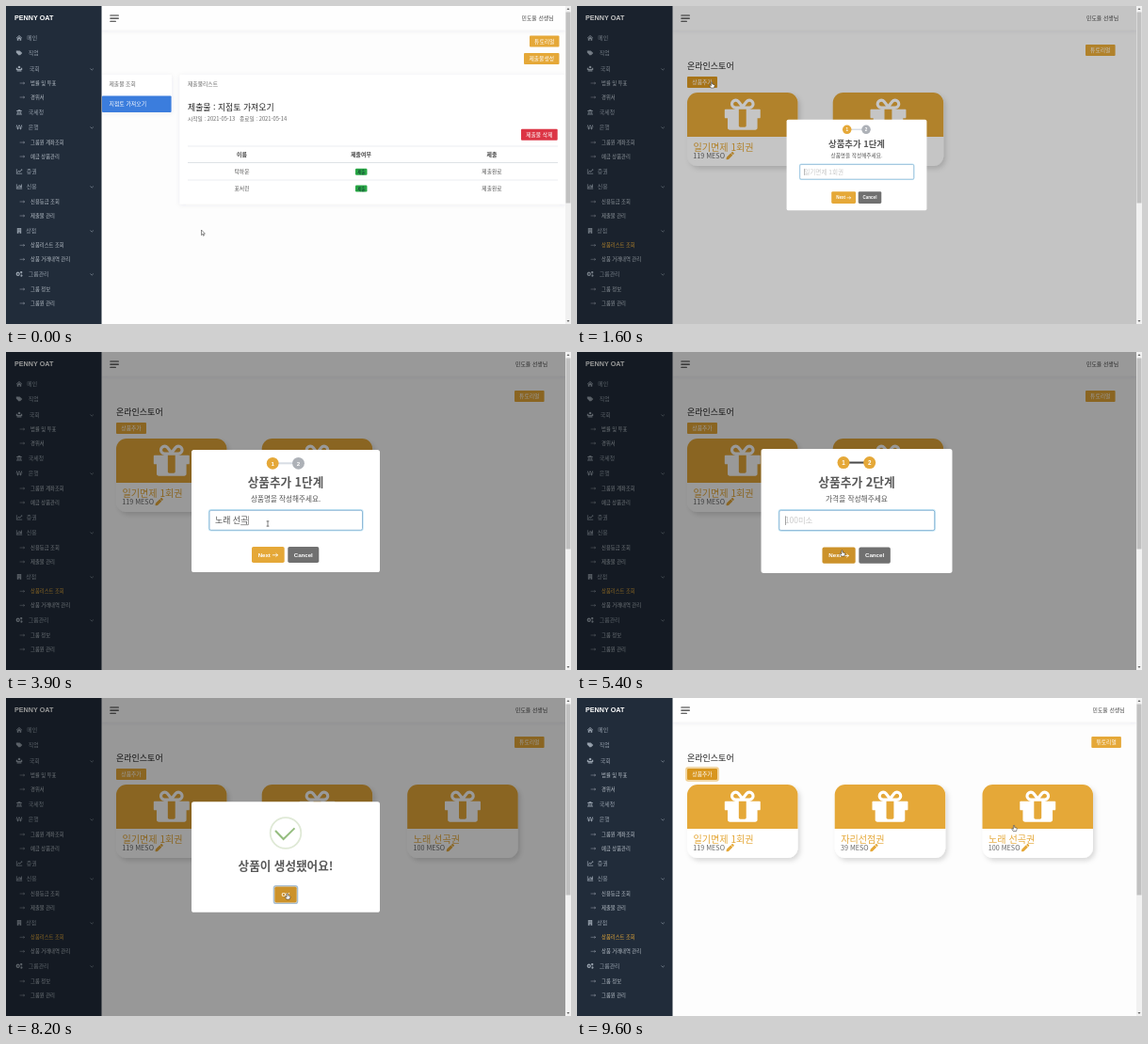
Animation, 600 px wide and 338 px high, one loop 9700 ms. Source, as an HTML page:

```html
<!DOCTYPE html>
<html lang="ko">
<head>
<meta charset="utf-8">
<title>온라인스토어</title>
<style>
html, body { margin: 0; width: 100%; height: 100%; overflow: hidden; background: #fdfdfd; }
svg { display: block; width: 600px; height: 338px; }
text { font-family: "Noto Sans CJK KR", "Noto Sans CJK", "Noto Sans", sans-serif; white-space: pre; }
.latin { font-family: "Liberation Sans", Arial, sans-serif; font-weight: 700; }
</style>
</head>
<body>
<svg id="stage" viewBox="0 0 600 338" xmlns="http://www.w3.org/2000/svg"></svg>
<script>
const LOOP = 9700, STEP = 100;
const ORANGE = '#e5a838', ORANGE_HOVER = '#cc922a', NAVY = '#212c3a';

// Drawn with y pointing up
const GIFT = 'M928 180v716h-320v-716q0-25 18-38.5t46-13.5h192q28 0 46 13.5t18 38.5zM472 1024h195l-126 161q-26 31-69 31q-40 0-68-28t-28-68t28-68t68-28zM1160 1120q0 40-28 68t-68 28q-43 0-69-31l-125-161h194q40 0 68 28t28 68zM1536 864v-320q0-14-9-23t-23-9h-96v-416q0-40-28-68t-68-28h-1088q-40 0-68 28t-28 68v416h-96q-14 0-23 9t-9 23v320q0 14 9 23t23 9h440q-93 0-158.5 65.5t-65.5 158.5t65.5 158.5t158.5 65.5q107 0 168-77l128-165l128 165q61 77 168 77q93 0 158.5-65.5t65.5-158.5t-65.5-158.5t-158.5-65.5h440q14 0 23-9t9-23z';
const PENCIL = 'M498 142l-46 46c-5 5-12 5-17 0l-111-111c-5-5-5-12 0-17l46-46c19-19 49-19 68 0l60 60c19 19 19 49 0 68zM284 100L22 362 0 484c-3 16 11 31 28 28l122-21 262-263c5-5 5-12 0-17l-111-111c-5-5-12-5-17 0z';

// Markup helpers
const text = (x, y, str, size, fill, extra = '') =>
  `<text x="${x}" y="${y}" font-size="${size}" fill="${fill}" ${extra}>${str}</text>`;
const mid = (x, y, str, size, fill, extra = '') =>
  text(x, y, str, size, fill, 'text-anchor="middle" ' + extra);
const rect = (x, y, w, h, fill, r = 0, extra = '') =>
  `<rect x="${x}" y="${y}" width="${w}" height="${h}" rx="${r}" fill="${fill}" ${extra}/>`;
const path = (d, extra) => `<path d="${d}" ${extra}/>`;
const line = (d, color, width) =>
  path(d, `fill="none" stroke="${color}" stroke-width="${width}" stroke-linecap="round" stroke-linejoin="round"`);
const group = (id, body, extra = '') => `<g id="${id}" ${extra}>${body}</g>`;
const button = (x, y, w, h, label, fill = ORANGE, id = '') =>
  rect(x, y, w, h, fill, 1, id && `id="${id}"`) + mid(x + w / 2, y + h / 2 + 2.1, label, 5.8, '#fff');

const ICONS = {
  home: 'M-3.2 .2L0-2.8 3.2 .2 2.7 .7 0-1.8-2.7 .7zM-2.2 .9L0-1.1 2.2 .9V2.9H.6V1.2H-.6V2.9H-2.2z',
  tag: 'M-3.2-2.4H-.3L2.2 .1-.3 2.6-3.2-.2zM.6-2.4L3.3 .2 .8 2.7 .3 2.2 2.3 .2-.2-2.4z',
  people: 'M-1.3-1.8a1.3 1.3 0 1 1 2.6 0a1.3 1.3 0 1 1-2.6 0zM-3.2-1h1.4v1.2h3.6V-1H3.2V1.2H-3.2zM-2.4 1.5H2.4V2.8H-2.4z',
  bank: 'M-3-1.2L0-2.9 3-1.2V-.7H-3zM-2.2-.4h1v2h-1zM-.5-.4h1v2h-1zM1.2-.4h1v2h-1zM-3 1.9H3V2.8H-3z',
  won: 'M-3.2-2.4H-2.3L-1.5 .9-.5-2.4H.5L1.5 .9 2.3-2.4H3.2L2 2.5H1L0-.6-1 2.5H-2zM-3.3-.7H3.3V0H-3.3z',
  chart: 'M-3.1-2.6H-2.4V2H3.2V2.7H-3.1zM-1.8 .6L-.4-1 .6 0 2.2-1.7 1.6-2.3H3.2V-.7L2.7-1.2 .6 1-.4 0-1.3 1.1z',
  bars: 'M-3.1-2.6H-2.4V2H3.2V2.7H-3.1zM-1.8 0H-.9V1.5H-1.8zM-.4-1.8H.5V1.5H-.4zM1-1H1.8V1.5H1zM2.2-2.2H3V1.5H2.2z',
  shop: 'M-2.2-2.9H2.2V2.9H.6V1.5H-.6V2.9H-2.2zM-1.3-2V-1.2H-.4V-2zM.4-2V-1.2H1.3V-2zM-1.3-.4V.4H-.4V-.4zM.4-.4V.4H1.3V-.4z',
  cogs: 'M-3.4 0L-2.8-1.7-1-2.3 .5-1.4 .9 .3 0 1.9-1.7 2.2-3 1.4zM-2 .1a.8.8 0 1 0 1.6 0a.8.8 0 1 0-1.6 0zM1.2-2.8L2.8-2.9 3.5-1.7 2.7-.4 1.3-.7zM1.5 .9L2.9 .5 3.6 1.7 2.9 2.9 1.5 2.7z'
};

// [label, y, icon, text x, has submenu]; entries without an icon are submenu items
const MENU = [
  ['메인', 34, 'home', 22], ['직업', 50, 'tag', 23.5],
  ['국회', 67, 'people', 24.5, 1], ['법률 및 투표', 82], ['경위서', 97],
  ['국세청', 113, 'bank', 23.5],
  ['은행', 129, 'won', 23.5, 1], ['그룹원 계좌조회', 145], ['예금 상품관리', 160],
  ['증권', 176, 'chart', 21.5],
  ['신용', 192, 'bars', 21.5, 1], ['신용등급 조회', 208], ['제출물 관리', 223],
  ['상점', 239, 'shop', 21, 1], ['상품리스트 조회', 254.3], ['상품 거래내역 관리', 269.3],
  ['그룹관리', 285, 'cogs', 23.5, 1], ['그룹 정보', 301], ['그룹원 관리', 316]
];

function menuItem([label, y, icon, x, open]) {
  if (!icon) {
    const id = label === '상품리스트 조회' ? 'id="current"' : '';
    return line(`M15 ${y}h4.6m-1-.8l1 .8l-1 .8`, '#aab2bc', .45) +
      text(26.1, y + 2, label, 5.3, '#b9c0c9', id);
  }
  return path(ICONS[icon], `transform="translate(14 ${y - .2})" fill="#97a1ad" fill-rule="evenodd"`) +
    text(x + .3, y + 1.9, label, 5.9, '#97a1ad') +
    (open ? line(`M89.8 ${y - .2}l1.4 1.3l1.4-1.3`, '#97a1ad', .6) : '');
}

const sidebar = rect(0, 0, 101.5, 338, NAVY) +
  text(9, 15.4, 'PENNY OAT', 7.2, '#fff', 'class="latin"') + MENU.map(menuItem).join('');

const header = rect(101.5, 0, 493, 25.5, '#fefefe', 0, 'filter="url(#soft)"') +
  line('M110.8 10h8.6M110.8 13.1h8.6M110.8 16.2h5.6', '#333', 1.15) +
  group('user', text(547.5, 14.8, '민도율 선생님', 5.9, '#444'));

const tableRow = (y, name) => mid(250.5, y, name, 5.8, '#555') +
  rect(371, y - 5.2, 12.5, 7, '#28a745', 1.2) + mid(377.2, y - .2, '제출', 4.3, '#123') +
  mid(516, y, '제출완료', 5.8, '#555');

const submitPage =
  button(556, 31.5, 31.5, 12, '튜토리얼') + button(550, 50, 37.5, 12, '제출물생성') +
  rect(102, 73, 74, 40, '#fff', 1, 'filter="url(#soft)"') +
  text(109.5, 85.4, '제출물 조회', 5.8, '#666') +
  rect(102, 95.5, 73.6, 17.5, '#3b7ddd', 1) + text(109.5, 106.3, '지점토 가져오기', 5.9, '#fff') +
  rect(184.5, 73, 409.5, 137.5, '#fff', 1, 'filter="url(#soft)"') +
  text(193, 85.4, '제출물리스트', 5.8, '#666') +
  text(193, 110.6, '제출물 : 지점토 가져오기', 8.9, '#222') +
  text(193, 122, '시작일 : 2021-05-13', 5.75, '#666') + text(248, 122, '종료일 : 2021-05-14', 5.75, '#666') +
  button(547, 130.7, 38.7, 12, '제출물 삭제', '#dc3545') +
  rect(193, 148.7, 393, .6, '#dee2e6') + rect(193, 166, 393, 1, '#dee2e6') + rect(193, 184.7, 393, .6, '#dee2e6') +
  [['이름', 250.5], ['제출여부', 377], ['제출', 516]].map(([s, x]) => mid(x, 160, s, 5.9, '#444', 'font-weight="700"')).join('') +
  tableRow(178, '탁하운') + tableRow(195.7, '표서린');

const product = (id, x, name, price, pencilX) => group(id,
  rect(x, 92, 117.5, 78, '#fff', 11, 'filter="url(#drop)"') +
  path(`M${x} 139V103a11 11 0 0 1 11-11h95.5a11 11 0 0 1 11 11v36z`, `fill="${ORANGE}"`) +
  path(GIFT, `transform="translate(${x + 39.8} 131.8) scale(.0247 -.0247)" fill="#fff" fill-rule="evenodd"`) +
  text(x + 6.5, 154.2, name, 10.1, ORANGE) +
  text(x + 6.3, 162.3, price + ' MESO', 7.2, '#666') +
  path(PENCIL, `transform="translate(${x + pencilX} 155) scale(.0162)" fill="${ORANGE}"`));

const storePage = text(117, 67, '온라인스토어', 9, '#222') +
  group('tutorial', button(546.3, 41, 31.6, 12, '튜토리얼')) +
  rect(116, 74, 34, 14, 'none', 2, 'id="addRing" stroke="#f0cd8c" stroke-width="1.6"') +
  button(117, 75, 32, 12, '상품추가', ORANGE, 'add') +
  product('card1', 117, '일기면제 1회권', 119, 41.5) +
  product('card2', 273.7, '자리선점권', 39, 37.6) +
  product('card3', 430.5, '노래 선곡권', 100, 41.5);

const swalButton = (x, y, w, h, label, fill, id, labelX = x + w / 2) => rect(x, y, w, h, fill, 1.8, `id="${id}"`) +
  mid(labelX, y + h / 2 + 2.2, label, 6.1, '#fff', 'class="latin"');
const stepDot = (x, n, id) => `<circle id="${id}" cx="${x}" cy="118.3" r="6.4" fill="${ORANGE}"/>` +
  mid(x, 120.6, n, 6.2, '#fff', 'class="latin"');

const prompt = rect(197, 104, 200, 130, '#fff', 2.6) +
  rect(289, 117.3, 16, 2, '#d8dde4', 0, 'id="stepLine"') + stepDot(283.2, 1, 'dot1') + stepDot(310.5, 2, 'dot2') +
  mid(297, 143.3, '', 12.6, '#595959', 'id="title" font-weight="700"') +
  mid(297, 158.7, '', 7.6, '#545454', 'id="hint"') +
  rect(216, 168.3, 162.5, 21, '#fff', 1.8, 'stroke="#c4e6f5" stroke-width="2.4"') +
  rect(216, 168.3, 162.5, 21, '#fff', 1.8, 'stroke="#86b3d3" stroke-width=".9"') +
  text(222, 182, '', 8.8, '#545454', 'id="field"') +
  rect(0, 183.5, 8, .6, '#545454', 0, 'id="compose"') +
  rect(0, 174.3, .6, 9.4, '#666', 0, 'id="caret"') +
  swalButton(261, 207, 34.7, 17, 'Next', ORANGE, 'next', 274.3) +
  line('M283.3 215.8h5.2m-1.7-1.5l1.7 1.5l-1.7 1.5', '#fff', .8) +
  swalButton(299.3, 207, 33, 17, 'Cancel', '#707070', 'cancel');

const success = rect(197, 110.3, 200, 117.5, '#fff', 2.6) +
  '<circle cx="297" cy="143.5" r="16.3" fill="none" stroke="#dfe9d6" stroke-width="1.8"/>' +
  path('M286 141L294.6 150L306.5 138.4', 'id="tick" fill="none" stroke="#95bd7f" stroke-width="2" pathLength="100" stroke-dasharray="100 200"') +
  mid(297, 183, '상품이 생성됐어요!', 12.6, '#595959', 'font-weight="700"') +
  rect(284.5, 199.7, 25, 18.6, 'none', 2.4, 'stroke="#a9bfd2" stroke-width="1.6"') +
  swalButton(285.3, 200.5, 23.4, 17, 'OK', ORANGE, 'ok');

const scrollbar = rect(594, 0, 6, 338, '#f1f1f1') + rect(594.5, 6.5, 5, 203, '#c1c1c1') +
  path('M597 2l1.5 2h-3zM597 336l1.5-2h-3z', 'fill="#666"');

const pointers =
  group('arrow', path('M0 0V5.6L1.3 4.4 2.1 6.3 2.9 6 2.1 4.1H3.9z', 'fill="#fff" stroke="#222" stroke-width=".5"')) +
  group('hand', path('M-.6 0Q0-.7 .6 0V2L3 2.7Q3.4 2.9 3.2 3.8L2.5 6H-.8L-2.4 3.5Q-2.2 2.7-1.4 3.2L-.6 3.9z', 'fill="#fff" stroke="#222" stroke-width=".5"')) +
  group('beam', line('M-1-2.6h2M0-2.6v5.2M-1 2.6h2', '#333', .6));

const stage = document.getElementById('stage');
stage.innerHTML = `<defs>
  <filter id="soft" x="-10%" y="-30%" width="120%" height="170%"><feDropShadow dx="0" dy="1" stdDeviation="2.4" flood-color="#445" flood-opacity=".08"/></filter>
  <filter id="drop" x="-10%" y="-10%" width="125%" height="130%"><feDropShadow dx="2.5" dy="3" stdDeviation="2.6" flood-opacity=".14"/></filter>
</defs>` + rect(0, 0, 600, 338, '#fdfdfd') + header +
  group('submitPage', submitPage) + group('storePage', storePage) + sidebar +
  rect(0, 0, 594, 338, '#000', 0, 'id="shade"') +
  group('prompt', prompt) + group('success', success) + scrollbar + group('pointer', pointers);

const el = {};
stage.querySelectorAll('[id]').forEach(node => { el[node.id] = node; });
const set = (id, name, value) => el[id].setAttribute(name, value);
const show = (id, on) => set(id, 'display', on ? 'inline' : 'none');
const shift = (id, x, y = 0) => set(id, 'transform', `translate(${x} ${y})`);

// Timing
const clamp = v => Math.max(0, Math.min(1, v));
const smooth = v => v * v * (3 - 2 * v);

function track(keys, t) {
  const i = keys.findIndex(k => k[0] > t);
  if (i === 0) return keys[0].slice(1);
  if (i < 0) return keys[keys.length - 1].slice(1);
  const a = keys[i - 1], b = keys[i], f = smooth((t - a[0]) / (b[0] - a[0]));
  return a.slice(1).map((v, n) => v + (b[n + 1] - v) * f);
}
const latest = (list, t) => list.reduce((got, [at, v]) => at <= t ? v : got, list[0][1]);

const MOVES = [
  [0, 207.5, 238], [100, 207.5, 238], [500, 45, 254], [800, 45, 254], [1300, 143, 81],
  [1750, 143, 81], [2000, 232, 104], [2300, 278, 182.5], [3950, 278, 182.5], [4120, 281.5, 211],
  [5500, 281.5, 211], [5880, 278.5, 184], [7100, 278.5, 184], [7300, 281.5, 211], [7700, 281.5, 211],
  [8000, 298.7, 208], [8350, 298.7, 208], [9000, 438, 150], [9300, 478, 150], [9600, 464, 135.5]
];
const SHAPES = [
  [0, 'arrow'], [450, 'hand'], [900, 'arrow'], [1200, 'hand'], [1800, 'arrow'], [2200, 'beam'],
  [4100, 'hand'], [5700, 'beam'], [7300, 'hand'], [7800, 'arrow'], [8000, 'hand'], [8400, 'arrow'], [8900, 'hand']
];
const TYPED = [
  [0, ''], [3200, 'ㄴ'], [3300, '노'], [3400, '놀'], [3500, '노래'], [3600, '노래 ㅅ'], [3700, '노래 선'],
  [3800, '노래 선고'], [3900, '노래 선곡'], [4000, '노래 선곡구'], [4100, '노래 선곡권'],
  [5223, ''], [6400, '1'], [6600, '10'], [6800, '100']
];
const SHADE = [[1570, 0], [1625, .4], [7500, .4], [7600, .25], [7680, .4], [8300, .4], [8420, 0]];
const POP = [[0, .7], [135, 1.05], [240, .95], [300, 1]];

function popup(id, t, from, to) {
  const out = clamp((t - to) / 150);
  show(id, t >= from && out < 1);
  const scale = track(POP, t - from)[0] * (1 - out / 2);
  set(id, 'transform', `translate(297 169) scale(${scale}) translate(-297 -169)`);
  set(id, 'opacity', 1 - out);
}

function drawField(t, second) {
  const typed = latest(TYPED, t), field = el.field;
  field.textContent = typed || (second ? '100미소' : '일기면제 1회권');
  set('field', 'fill', typed ? '#545454' : '#c9c9c9');
  set('field', 'font-size', second ? 8.3 : 8.9);
  const end = 222 + (typed ? field.getComputedTextLength() : 0);
  const since = t < 3200 ? 1600 : t < 5223 ? 4100 : t < 6400 ? 5223 : 6800;
  set('caret', 'x', end + .2);
  show('caret', t < since || Math.floor((t - since) / 500) % 2 === 0);
  set('compose', 'x', end - 8);
  show('compose', typed && !second && t < 4600);
}

function render(t) {
  const store = t >= 700, second = t >= 5223;
  show('submitPage', !store);
  show('storePage', store);
  set('current', 'fill', store ? ORANGE : '#b9c0c9');

  // An open dialog narrows the page
  const narrow = t >= 1570 && t < 8400;
  shift('user', narrow ? -6.5 : 0);
  shift('tutorial', narrow ? -6.3 : 0);
  shift('card2', narrow ? -2 : 0);
  shift('card3', narrow ? -4.3 : 0);
  show('card3', t >= 7600);
  show('addRing', t >= 8400);
  set('add', 'fill', t >= 8400 || (t >= 1200 && t < 1800) ? '#d8961f' : ORANGE);
  set('shade', 'opacity', track(SHADE, t)[0]);

  if (second) popup('prompt', t, 5223, 7400);
  else popup('prompt', t, 1570, 5073);
  el.title.textContent = `상품추가 ${second ? 2 : 1}단계`;
  el.hint.textContent = second ? '가격을 작성해주세요' : '상품명을 작성해주세요.';
  set('dot2', 'fill', second ? ORANGE : '#adb1b7');
  set('stepLine', 'fill', second ? '#4a4a4a' : '#d8dde4');
  drawField(t, second);

  popup('success', t, 7600, 8280);
  set('tick', 'stroke-dashoffset', 100 * (1 - smooth(clamp((t - 7750) / 400))));

  const [x, y] = track(MOVES, t), shape = latest(SHAPES, t);
  shift('pointer', x, y);
  ['arrow', 'hand', 'beam'].forEach(id => show(id, id === shape));
  set('next', 'fill', shape === 'hand' && y > 207 ? ORANGE_HOVER : ORANGE);
  set('ok', 'fill', shape === 'hand' ? ORANGE_HOVER : ORANGE);
}

const start = performance.now();
function tick() {
  const t = (performance.now() - start) % LOOP;
  render(Math.floor(t / STEP) * STEP);
  requestAnimationFrame(tick);
}
tick();
</script>
</body>
</html>
```
